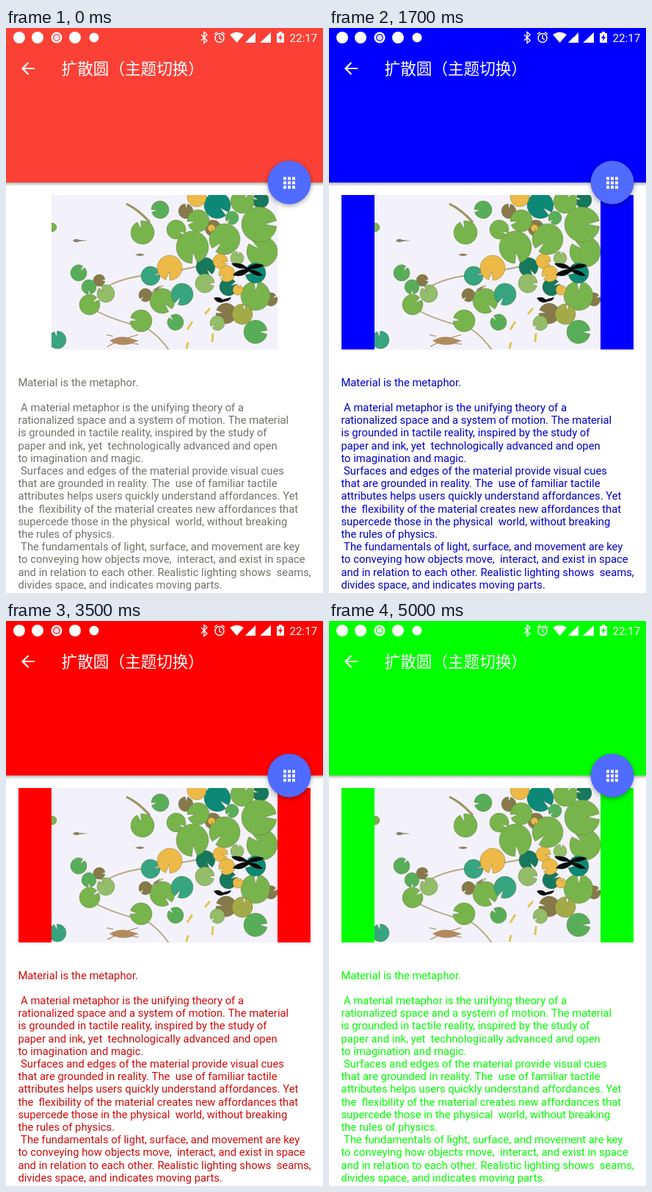
Recreate the animation shown at these times as an HTML page with a canvas. Size 432 by 768 pixels, loop 5.5 s.

```html
<!DOCTYPE html>
<html lang="zh">
<head>
<meta charset="utf-8">
<title>扩散圆</title>
<style>
html, body { margin: 0; width: 100%; height: 100%; overflow: hidden; background: #fff; }
canvas { display: block; width: 432px; height: 768px; }
</style>
</head>
<body>
<canvas id="stage" width="432" height="768"></canvas>
<script>
const g = document.getElementById('stage').getContext('2d');
const LOOP = 5500, STEP = 100, TAU = Math.PI * 2;
const FAB = { x: 386, y: 210, r: 29.5 };
const REVEAL = { time: 1172, radius: 678 };

const themes = [
  { bar: '#fb4036', text: '#737368', frame: '#fff' },
  { bar: '#00f', text: '#0000c8', frame: '#00f' },
  { bar: '#f00', text: '#d00a0a', frame: '#f00' },
  { bar: '#0f0', text: '#0f0', frame: '#0f0' }
];
// Start of each theme change and the tap that causes it
const changes = [
  { start: 504, tap: 440, x: 387, y: 212 },
  { start: 2034, tap: 2140, x: 381, y: 219 },
  { start: 3434, tap: 3540, x: 384, y: 214 }
];

const lines = `Material is the metaphor.

 A material metaphor is the unifying theory of a
rationalized space and a system of motion. The material
is grounded in tactile reality, inspired by the study of
paper and ink, yet  technologically advanced and open
to imagination and magic.
 Surfaces and edges of the material provide visual cues
that are grounded in reality. The  use of familiar tactile
attributes helps users quickly understand affordances. Yet
the  flexibility of the material creates new affordances that
supercede those in the physical  world, without breaking
the rules of physics.
 The fundamentals of light, surface, and movement are key
to conveying how objects move,  interact, and exist in space
and in relation to each other. Realistic lighting shows  seams,
divides space, and indicates moving parts.`.split('\n');

// Lily pads by colour: x, y, radius
const pads = [
  ['#87794a', [[127, 343, 8], [190, 363, 9], [245, 249, 10], [282, 272, 11], [300, 388, 14], [361, 369, 9]]],
  ['#16785c', [[272, 325, 13], [347, 234, 11], [303, 352, 12]]],
  ['#78b44c', [[63, 271, 6], [186, 278, 16], [232, 274, 13], [262, 262, 15], [322, 236, 16], [254, 298, 22],
    [349, 304, 21], [345, 267, 24], [298, 287, 21], [340, 364, 20], [213, 371, 17], [184, 398, 15], [114, 376, 14]]],
  ['#58ae58', [[210, 247, 12], [99, 333, 11], [113, 352, 10], [231, 400, 11], [340, 413, 16], [308, 258, 9]]],
  ['#93bd68', [[136, 361, 12], [271, 347, 13], [288, 401, 10], [315, 313, 9]]],
  ['#a3aa48', [[322, 389, 14]]],
  ['#36a580', [[197, 337, 13], [240, 362, 15], [70, 424, 12]]],
  ['#0c8976', [[288, 241, 18], [340, 333, 14]]],
  ['#edb947', [[223, 326, 17], [260, 230, 13], [292, 317, 10], [301, 334, 11], [316, 356, 7], [280, 272, 5]]]
];

function disc(x, y, r, color) {
  g.fillStyle = color;
  g.beginPath();
  g.arc(x, y, r, 0, TAU);
  g.fill();
}

function shape(d, color, width) {
  const p = new Path2D(d);
  if (width) {
    g.strokeStyle = color;
    g.lineWidth = width;
    g.stroke(p);
  } else {
    g.fillStyle = color;
    g.fill(p);
  }
}

function box(x, y, w, h, color) {
  g.fillStyle = color;
  g.fillRect(x, y, w, h);
}

function label(text, x, y, font, color) {
  g.font = font;
  g.fillStyle = color;
  g.fillText(text, x, y);
}

function page(theme) {
  box(0, 0, 432, 768, '#fff');
  const shade = g.createLinearGradient(0, 210, 0, 215);
  shade.addColorStop(0, 'rgba(0,0,0,.3)');
  shade.addColorStop(1, 'rgba(0,0,0,0)');
  box(0, 210, 432, 5, shade);
  box(0, 0, 432, 210, theme.bar);
  box(17, 227, 398, 210, theme.frame);
  lines.forEach((s, i) => label(s, 16.4, 486.6 + i * 17.2, '14.8px Roboto, sans-serif', theme.text));
}

function pad(x, y, r, color, turn) {
  g.beginPath();
  g.arc(x, y, r, turn + .16, turn + TAU - .16);
  g.lineTo(x + r * .3 * Math.cos(turn), y + r * .3 * Math.sin(turn));
  g.closePath();
  g.fillStyle = color;
  g.fill();
  g.strokeStyle = 'rgba(85,100,40,.45)';
  g.lineWidth = .8;
  g.stroke();
}

function picture() {
  g.save();
  g.beginPath();
  g.rect(62, 227, 308, 210);
  g.clip();
  box(62, 227, 308, 210, '#f3f2fa');
  shape('M164 239Q186 252 198 268M128 358Q150 341 190 336T272 322M122 384Q140 394 172 403M192 408Q210 420 222 438M190 365L214 350', '#b5a983', 2);
  shape('M164 239Q180 246 196 264', '#9c9360', 3);
  pads.forEach(([color, spots], k) =>
    spots.forEach(([x, y, r], i) => pad(x, y, r, color, i * 2.4 + k)));
  // Fish, shrimp and petals
  shape('M91 289q4-4 9-1l12 1l-12 1q-5 3-9-1zM176 308q7-3 13 0q-6 4-13 0zM200 356l10-6l-4 8z', '#8e8268');
  shape('M141 425q14-8 26-4l14 4l-13 5q-15 3-27-5z', '#b18b60');
  shape('M146 419l-9-2M148 428l-10 5M166 421l14-4M168 428l13 2', '#a58258', 1.2);
  shape('M271 389l7-8M247 410l7-11M281 427l1-12M246 436l2-9', '#dfc65a', 3);
  shape('M307 320q14-2 22 6q10-8 22-4q0 4-19 6q14 2 18 9q-12 1-19-7q-8 10-22 6q3-6 18-9q-15 1-20-7z', '#080c09');
  shape('M283 367q8-3 12 2l12-3q-1 5-10 6q-8 4-14-5z', '#080c09');
  g.restore();
}

function statusBar(bar) {
  const w = '#fff';
  [18, 43, 94].forEach(x => disc(x, 13, 8, w));
  disc(120, 13, 6.5, w);
  disc(69, 13, 7.5, w);
  disc(69, 13, 5, bar);
  disc(69, 13, 3.8, 'rgba(255,255,255,.85)');
  shape('M266 9l8 8l-4 3.5v-15l4 3.5l-8 8', w, 1.4);
  shape('M297 13.5a6 6 0 1 1-12 0a6 6 0 1 1 12 0M291 9.5v4.5l3 2M284 8.5l4-3M298 8.5l-4-3', w, 1.5);
  shape('M305 9Q314.5 2 324 9L314.5 20z', w);
  shape('M340 6v14h-14zM361 6v14h-15z', w);
  shape('M333 12v8h-7z', 'rgba(255,255,255,.6)');
  shape('M369 7h3v-2h4v2h3v13h-10z', w);
  shape('M375 8l-4 6h2.5l-.5 4l4-6h-2.5z', bar);
  label('22:17', 386.5, 18.5, '15.2px Roboto, sans-serif', w);
}

function toolbar() {
  shape('M39 55H23M30.5 47L22.5 55L30.5 63', '#fff', 2.2);
  label('扩散圆（主题切换）', 75.6, 62.6, '21.6px "Noto Sans CJK SC", "Noto Sans CJK", sans-serif', '#fff');
}

function button(t) {
  g.save();
  g.shadowColor = 'rgba(0,0,0,.35)';
  g.shadowBlur = 6;
  g.shadowOffsetY = 2;
  disc(FAB.x, FAB.y, FAB.r, '#506bff');
  g.restore();
  g.save();
  g.beginPath();
  g.arc(FAB.x, FAB.y, FAB.r, 0, TAU);
  g.clip();
  for (const c of changes) {
    const age = t - c.tap;
    if (age >= 0 && age < 900)
      disc(c.x, c.y, 8 + age * .06, `rgba(255,255,255,${.36 * (1 - age / 900)})`);
  }
  g.restore();
  for (let i = 0; i < 9; i++)
    box(378 + i % 3 * 6, 202.5 + Math.floor(i / 3) * 6, 4, 4, '#fff');
}

function draw(t) {
  page(themes[0]);
  let bar = themes[0].bar;
  changes.forEach((c, i) => {
    const p = Math.min((t - c.start) / REVEAL.time, 1);
    if (p <= 0) return;
    const theme = themes[i + 1];
    const r = REVEAL.radius * (1 - Math.cos(Math.PI * p)) / 2;
    g.save();
    if (p < 1) {
      g.beginPath();
      g.arc(FAB.x, FAB.y, r, 0, TAU);
      g.clip();
    }
    page(theme);
    if (r < 40) {
      disc(FAB.x, FAB.y, r, theme.bar);
      disc(FAB.x, FAB.y, r, 'rgba(0,0,0,.14)');
    }
    g.restore();
    if (r > 330) bar = theme.bar;
  });
  picture();
  statusBar(bar);
  toolbar();
  button(t);
}

const begin = performance.now();
function tick(now) {
  const t = Math.max(0, now - begin) % LOOP;
  draw(Math.floor(t / STEP) * STEP);
  requestAnimationFrame(tick);
}
draw(0);
requestAnimationFrame(tick);
</script>
</body>
</html>
```
